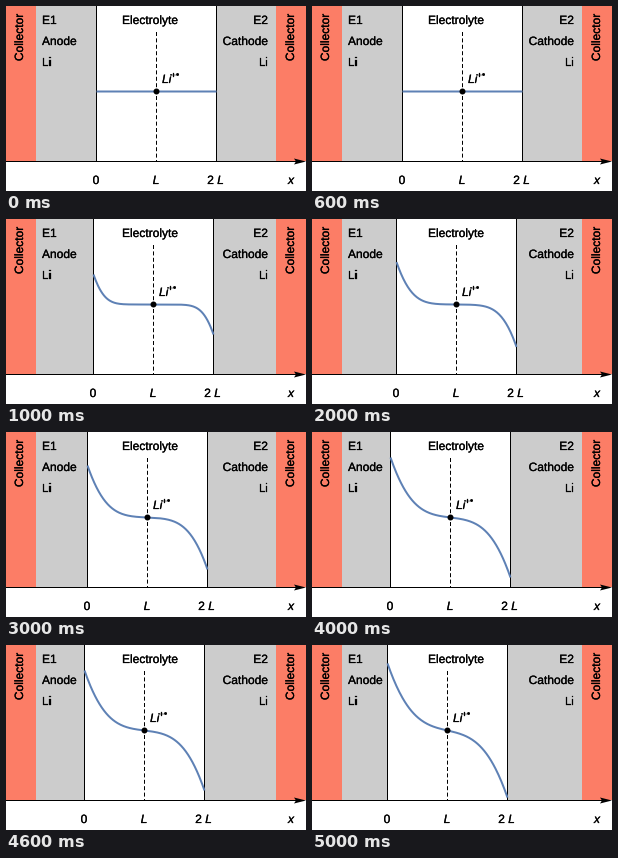
A matplotlib script for the animation above (6000 ms loop, 300x185 px).

```python
import math
import numpy as np
import matplotlib.pyplot as plt
from matplotlib.animation import FuncAnimation
from matplotlib.patches import Circle, Polygon, Rectangle
from matplotlib.patheffects import withStroke

W, H, DPI = 300, 185, 100
PX = 72 / DPI                        # points per pixel
BASE, MID_Y, GAP = 155, 85.5, 120    # axis row, rest level, electrolyte width
RED, GREY, BLUE = "#fc7d66", "#cccccc", "#5e81b5"

plt.rcParams["font.family"] = "Liberation Sans"
fig = plt.figure(figsize=(W / DPI, H / DPI), dpi=DPI, facecolor="white")
ax = fig.add_axes([0, 0, 1, 1])
ax.set_xlim(0, W)
ax.set_ylim(H, 0)
ax.axis("off")
INK = [withStroke(linewidth=0.25 * PX, foreground="black")]


def rect(x, w, color):
    patch = Rectangle((x, 0), w, BASE, fc=color, lw=0, zorder=1)
    return ax.add_patch(patch)


def label(x, y, s, ha="left", size=12, **kw):
    kw.setdefault("va", "baseline")
    return ax.text(x, y, s, ha=ha, fontsize=size * PX, zorder=6,
                   path_effects=INK, **kw)


def line(width=1, color="black", **kw):
    return ax.plot([], [], color=color, lw=width * PX, snap=False, **kw)[0]


def ierfc(u):
    return math.exp(-u * u) / math.sqrt(math.pi) - u * math.erfc(u)


def profile(d, k):
    """Height above the rest level at distance d from the left electrode."""
    if k == 0:
        return 0.0
    span = 18.5 * math.sqrt(k)
    amp = 30 * math.sqrt(k * math.pi)
    return amp * (ierfc(d / span) - ierfc((GAP - d) / span))


# Fixed parts
rect(0, 30, RED)
rect(270, 30, RED)
for x in (14, 285):
    label(x, 31.5, "Collector", "center", va="center", rotation=90)
for x, ha, words in ((36, "left", ("E1", "Anode", "Li")),
                     (262, "right", ("E2", "Cathode", "Li"))):
    for row, word in enumerate(words):
        label(x, 18 + 21 * row, word, ha)
label(144, 18, "Electrolyte", "center")
label(285, 178, "x", "center", style="italic")
axis = line(zorder=4)
axis.set_data([0, 293], [BASE + 0.5] * 2)
ax.add_patch(Polygon([(288, 152.5), (300, 155.5), (288, 158.5), (290, 155.5)],
                     fc="black", lw=0, zorder=5))

# Moving parts
anode = rect(30, 60, GREY)
cathode = rect(210, 60, GREY)
walls = [line(zorder=3), line(zorder=3)]
middle = line(zorder=2, dashes=(4, 2.4))
curve = line(2, BLUE, zorder=3, solid_capstyle="butt")
dot = ax.add_patch(Circle((0, MID_Y), 3, fc="black", lw=0, zorder=5))
zero = label(0, 178, "0", "center")
one = label(0, 178, "L", "center", style="italic")
two = label(0, 178, "2")
two_l = label(0, 178, "L", style="italic")
ion = label(0, 77, "Li", style="italic")
plus = label(0, 72, "+", size=9.5)
bullet = label(0, 71.5, "•", size=9)
dist = np.linspace(0, GAP, 161)


def draw(k):
    left = 90 - 3 * k
    mid, right = left + GAP / 2, left + GAP
    anode.set_width(left - 30)
    cathode.set_x(right)
    cathode.set_width(270 - right)
    for wall, x in zip(walls, (left, right)):
        wall.set_data([x + 0.5] * 2, [0, BASE])
    middle.set_data([mid + 0.5] * 2, [26, BASE])
    curve.set_data(left + 0.5 + dist, [MID_Y - profile(d, k) for d in dist])
    dot.set_center((mid + 0.5, MID_Y))
    for text, x in ((zero, left), (one, mid), (two, right - 8.8),
                    (two_l, right + 1.2), (ion, mid + 6),
                    (plus, mid + 15), (bullet, mid + 20)):
        text.set_x(x)
    return []


anim = FuncAnimation(fig, draw, frames=6, interval=1000, repeat=True,
                     repeat_delay=0, init_func=lambda: draw(0), blit=False)
plt.show()
```
